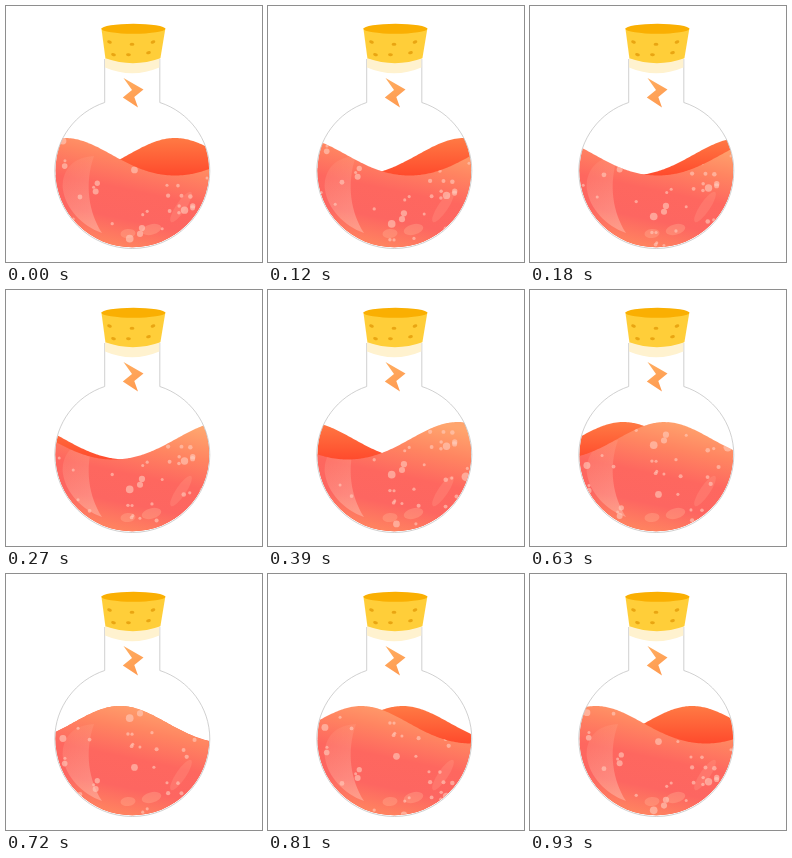
Animation, 256 px wide and 256 px high, one loop 960 ms. Source, as an HTML page with a canvas:

```html
<!DOCTYPE html>
<html lang="en">
<head>
<meta charset="utf-8">
<title>Potion flask</title>
<style>
html, body { margin: 0; width: 100%; height: 100%; overflow: hidden; background: #fff; }
canvas { display: block; width: 256px; height: 256px; }
</style>
</head>
<body>
<canvas id="stage" width="256" height="256"></canvas>
<script>
const ctx = document.getElementById('stage').getContext('2d');
const LOOP = 960, STEP = 30, TAU = Math.PI * 2;
const WAVE = { length: 220, mean: 150.75, height: 18.75, sharpness: 2.5, axis: 114 };
const BUBBLES = { count: 46, top: 130, travel: 118 };

function seededRandom(seed) {
  return () => (seed = (seed * 16807) % 2147483647) / 2147483647;
}

const random = seededRandom(4219);
const bubbles = Array.from({ length: BUBBLES.count }, () => ({
  x: 52 + 149 * random(),
  start: random(),
  radius: 1.5 + 2.7 * random() ** 3
}));

function gradient(x0, y0, x1, y1, ...colors) {
  const g = ctx.createLinearGradient(x0, y0, x1, y1);
  colors.forEach((c, i) => g.addColorStop(i / (colors.length - 1), c));
  return g;
}

const frontFill = gradient(142, 128, 118, 243, '#ffa56e', '#ff8561', '#fe675f', '#fd6661', '#ff8660');
const backFill = gradient(0, 132, 0, 170, '#ff7a44', '#ff4a2c');
const glossFill = gradient(58, 155, 94, 218, 'rgba(255,185,160,.1)', 'rgba(255,190,175,.5)');
const boltFill = gradient(118, 72, 132, 101, '#ffad60', '#ff9a50');

function fill(path, color) {
  ctx.fillStyle = color;
  ctx.fill(path);
}

function ellipse(x, y, rx, ry, angle = 0) {
  const p = new Path2D();
  p.ellipse(x, y, rx, ry, angle, 0, TAU);
  return p;
}

const bowl = ellipse(126.3, 164.5, 76.8, 76.8);
const outline = new Path2D('M98.7 53V96.5C70 106 48.8 133 48.8 165A77.5 77.5 0 0 0 203.8 165C203.8 133 183 106 153.8 96.5V53');
const gloss = new Path2D('M88 150C63 151 55 169 57 184C60 203 76 220 96 227C83 207 78 178 88 150Z');
const cork = new Path2D('M95.4 22.3L99.4 52.3Q127 62 154.4 52.3L159.4 22.3Z');
const corkShade = new Path2D('M99 52V61.5Q126.5 73 153.3 61.5V52Z');
const bolt = new Path2D('M117.5 72L137.5 83.5L128.3 91L132 101.5L116.8 91.5L126 84Z');

// A cosine with slightly narrowed crests and widened troughs
function wave(peak) {
  const p = new Path2D();
  p.moveTo(45, 246);
  for (let x = 45; x <= 208; x++) {
    const angle = TAU * (x - peak) / WAVE.length;
    p.lineTo(x, WAVE.mean - WAVE.height * Math.cos(angle) + WAVE.sharpness * Math.sin(angle) ** 2);
  }
  p.lineTo(208, 246);
  p.closePath();
  return p;
}

function drawBubbles(phase) {
  for (const { x, start, radius } of bubbles) {
    const y = BUBBLES.top + BUBBLES.travel * (1 - (start + phase) % 1);
    fill(ellipse(x, y, radius, radius), 'rgba(255,205,190,.6)');
  }
}

function drawLiquid(phase) {
  // The two waves mirror each other about the axis
  const offset = WAVE.length * (0.25 + phase);
  const front = wave(WAVE.axis - offset);
  ctx.save();
  ctx.clip(bowl);
  fill(wave(WAVE.axis + offset), backFill);
  fill(front, frontFill);
  ctx.clip(front);
  fill(gloss, glossFill);
  const shine = 'rgba(255,180,150,.34)';
  fill(ellipse(122, 227.5, 7.5, 4.5, -0.1), shine);
  fill(ellipse(145.5, 223.5, 10, 5.2, -0.25), shine);
  fill(ellipse(175, 201, 18, 5, -0.98), 'rgba(255,165,145,.25)');
  drawBubbles(phase);
  ctx.restore();
}

function drawCork() {
  fill(corkShade, '#fff2cf');
  fill(cork, '#ffce39');
  fill(ellipse(127.4, 22.8, 32, 5), '#faaf02');
  for (const [x, y] of [[103.5, 36], [126, 38.3], [147, 36], [142.5, 46.7], [107.5, 48.7], [122.5, 48.7]]) {
    fill(ellipse(x, y, 2.4, 1.5, (126 - x) / 70), '#e9a512');
  }
}

function draw(now) {
  const time = Math.floor((now % LOOP) / STEP) * STEP;
  ctx.fillStyle = '#fff';
  ctx.fillRect(0, 0, 256, 256);
  drawLiquid(time / LOOP);
  ctx.strokeStyle = '#c4c4c4';
  ctx.lineWidth = 0.8;
  ctx.stroke(outline);
  drawCork();
  fill(bolt, boltFill);
}

let start;
function tick(now) {
  start ??= now;
  draw(now - start);
  requestAnimationFrame(tick);
}
draw(0);
requestAnimationFrame(tick);
</script>
</body>
</html>
```
